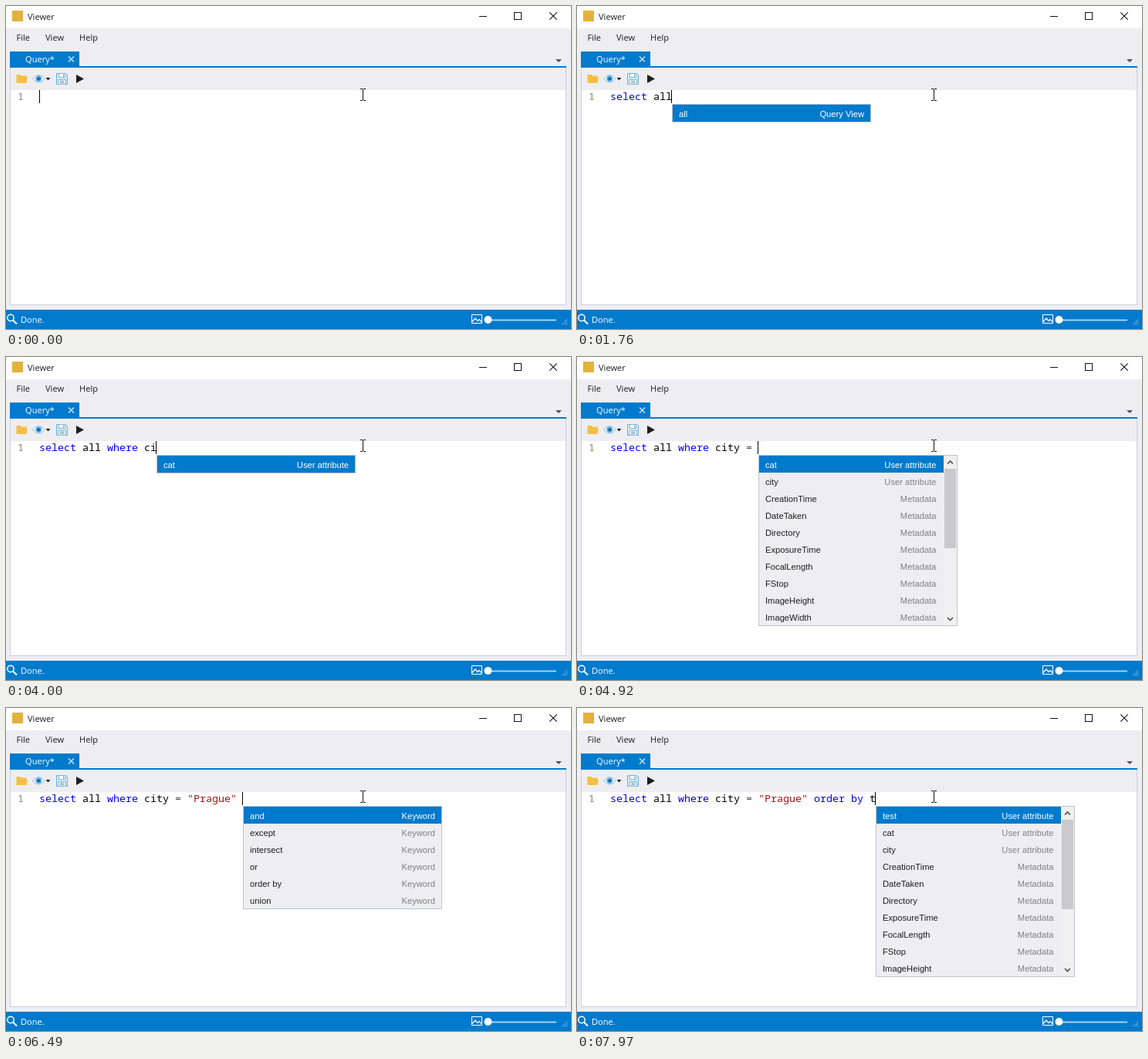
Animation of 732 by 419 pixels, one loop 8 s. Source, as an HTML page:

```html
<!DOCTYPE html>
<html lang="en">
<head>
<meta charset="utf-8">
<title>Viewer</title>
<style>
  html, body { margin: 0; width: 100%; height: 100%; overflow: hidden; background: #eeeef2; }
  svg { display: block; }
  .ui { font: 11.1px "Open Sans", "Noto Sans", sans-serif; fill: #1e1e1e; }
  .code { font: 13.333px "Noto Sans Mono", "DejaVu Sans Mono", monospace; }
  .list { font: 11.2px "Liberation Sans", Arial, sans-serif; fill: #1e1e1e; }
  .kind { fill: #7f7f84; text-anchor: end; }
  .light, .light .kind { fill: #fff; }
  .crisp { shape-rendering: crispEdges; }
  .line { fill: none; stroke: #111; }
</style>
</head>
<body>
<svg width="732" height="419" viewBox="0 0 732 419">
  <rect width="732" height="419" fill="#eeeef2"/>
  <rect width="732" height="29" fill="#fff"/>

  <!-- title bar -->
  <rect x="8" y="6" width="14" height="14" fill="#e3b23c"/>
  <text class="ui" x="28" y="18">Viewer</text>
  <g class="line">
    <path class="crisp" d="M613 13.5h10M658.5 8.5h9v9h-9z"/>
    <path d="M704.3 8.3l9.4 9.4M713.7 8.3l-9.4 9.4" stroke-width="1.1"/>
  </g>

  <!-- menu -->
  <g class="ui">
    <text x="13.5" y="45">File</text>
    <text x="51" y="45">View</text>
    <text x="95" y="45">Help</text>
  </g>

  <!-- tab and panel -->
  <g class="crisp">
    <rect x="5" y="59" width="90" height="20" fill="#007acc"/>
    <rect x="5.5" y="79.5" width="720" height="308" fill="#eeeef2" stroke="#cccedb"/>
    <rect x="5" y="78" width="721" height="2" fill="#007acc"/>
    <rect x="6" y="109" width="719" height="278" fill="#fff"/>
  </g>
  <text class="ui light" x="25" y="73">Query*</text>
  <path d="M81 65.5l7 7M88 65.5l-7 7" stroke="#b9dcf3" stroke-width="1.7"/>
  <path d="M712 69h8l-4 4z" fill="#5d4a66"/>

  <!-- toolbar -->
  <path d="M13.5 89h5l1.5 1.5h6.5v2H28l-1.5 7.5h-13z" fill="#f5bf45"/>
  <path d="M34.500 94.500Q42.500 84.500 50 94.500Q42.500 104 34.500 94.500z" fill="#f3f9fd" stroke="#85bfe3"/>
  <circle cx="42.300" cy="94.300" r="3.800" fill="#4ba3dc"/>
  <circle cx="42.300" cy="94.300" r="1.600" fill="#174f7c"/>
  <path d="M51.500 93h6l-3 3.500z" fill="#222"/>
  <path d="M65.500 87.500h12l2 2v12h-14z" fill="#d5ebf8" stroke="#6ab0d8"/>
  <path d="M68.500 87.500h8v5h-8zM68 95.500h9.500v6H68z" fill="#fff" stroke="#7fb4d2"/>
  <path d="M74.500 88.500v3M70 97.500h5.500M70 99.500h5.500" stroke="#5f8fa9"/>
  <path d="M91 89l10 5.500-10 5.500z" fill="#1e1e1e"/>

  <!-- status bar -->
  <rect y="394" width="732" height="25" fill="#007acc"/>
  <g fill="none" stroke="#fff">
    <circle cx="6" cy="404.500" r="4.200" stroke-width="1.500"/>
    <path d="M9 407.500l5 5" stroke-width="2"/>
    <path d="M603.500 400.500h13v11h-13z"/>
    <path d="M604 409.500l4-4.500 3 3.500 2-2 3.500 3.500" stroke-width="1.200"/>
    <path d="M625 407.500h88" stroke="#a5d0ee" stroke-width="1.800"/>
  </g>
  <circle cx="624.500" cy="407" r="5" fill="#fff"/>
  <text class="ui light" x="19" y="411">Done.</text>
  <g id="grip" class="crisp" fill="#a9c9de"></g>

  <!-- editor -->
  <text class="code" x="15" y="122" fill="#8b8b6c">1</text>
  <g id="editor"></g>
  <path class="line crisp" d="M459 107.500h3M463 107.500h3M462.500 108v14M459 122.500h3M463 122.500h3"/>
</svg>

<script>
const DURATION = 8000, LEFT = 43, CHAR = 8, ROW = 22, MAX_ROWS = 10;
const query = 'select all where city = "Prague" order by t';
const keywords = new Set(["select", "where", "or", "order", "by"]);

const items = (kind, names) => names.split(" ").map(name => [name, kind]);
const one = (name, kind) => [[name, kind]];
const orderBy = ["order by", "Keyword"];

const views = items("Query View", "all cats photos videos");
const afterView = [...items("Keyword", "except intersect"), orderBy, ...items("Keyword", "union where")];
const afterTerm = [...items("Keyword", "and except intersect or"), orderBy, ...items("Keyword", "union")];
const attributes = [
  ...items("User attribute", "cat city"),
  ...items("Metadata", "CreationTime DateTaken Directory ExposureTime FocalLength FStop ImageHeight " +
    "ImageWidth LastAccessTime LastWriteTime Latitude Longitude Name Orientation Size"),
  ...items("User attribute", "test"),
];
const prague = one('"Prague"', "String");

// Entries that start with the typed part come before those that only contain it.
function match(list, part) {
  const at = item => item[0].toLowerCase().indexOf(part);
  return [...list.filter(i => at(i) === 0), ...list.filter(i => at(i) > 0)];
}

// [time, typed characters, suggestions, caret hidden]
const steps = [
  [0, 0],
  [530, 0, null, true],
  [760, 1, one("select", "Keyword")],
  [830, 2, one("select", "Keyword")],
  [1290, 6],
  [1370, 7],
  [1450, 7, views],
  [1600, 8, one("all", "Query View")],
  [1680, 9, one("all", "Query View")],
  [1760, 10, one("all", "Query View")],
  [2290, 10, one("all", "Query View"), true],
  [2610, 11, afterView],
  [2840, 12, match(afterView, "w")],
  [3240, 16],
  [3390, 16, null, true],
  [3850, 17, attributes],
  [3930, 18, match(attributes, "c")],
  [4000, 19, one("cat", "User attribute")],
  [4080, 19, match(attributes, "ci")],
  [4460, 21],
  [4540, 22],
  [4620, 22, afterTerm],
  [4770, 23, attributes],
  [4920, 24, attributes],
  [5090, 25, prague],
  [5170, 26, prague],
  [5240, 27, prague],
  [5410, 32, prague],
  [5710, 32, prague, true],
  [6260, 32, prague],
  [6490, 33, afterTerm],
  [6810, 34, match(afterTerm, "o")],
  [6890, 35, one("or", "Keyword")],
  [7040, 36, [orderBy]],
  [7270, 37, [orderBy]],
  [7350, 38, [orderBy]],
  [7500, 41],
  [7820, 42],
  [7900, 42, attributes],
  [7970, 43, match(attributes, "t")],
];

const rect = (x, y, w, h, fill, extra = "") =>
  `<rect class="crisp" x="${x}" y="${y}" width="${w}" height="${h}" fill="${fill}" ${extra}/>`;

function color(token) {
  if (keywords.has(token)) return "#00f";
  if (/^".+"$/.test(token)) return "#a31515";
  return token === "=" ? "#444" : "#000";
}

function drawCode(text) {
  return [...text.matchAll(/"[^"]*"|\w+|\S/g)].map(({ 0: token, index }) =>
    `<text class="code" x="${LEFT + CHAR * index}" y="122" fill="${color(token)}">${token}</text>`).join("");
}

function drawScrollbar(x, count) {
  const thumb = Math.round(186 * MAX_ROWS / count);
  return rect(x, 128, 16, 220, "#f0f0f0") + rect(x, 145, 15, thumb, "#c9c9cc") +
    `<path d="M${x + 4} 138.500l3.500-3.500 3.500 3.500M${x + 4} 338l3.500 3.500 3.500-3.500"
      fill="none" stroke="#505050" stroke-width="1.600"/>`;
}

function drawPopup(x, list) {
  const rows = list.slice(0, MAX_ROWS);
  const scrolls = list.length > MAX_ROWS;
  const width = scrolls ? 239 : 256;
  const kindX = x + (scrolls ? 230.5 : 249);
  const body = rows.map(([name, kind], i) => {
    const y = 143.5 + ROW * i;
    return `<g class="list ${i ? "" : "light"}"><text x="${x + 9}" y="${y}">${name}</text>` +
      `<text class="kind" x="${kindX}" y="${y}">${kind}</text></g>`;
  }).join("");
  return rect(x + .5, 127.5, 257, ROW * rows.length + 1, "#eeeef2", 'stroke="#bfc2cc"') +
    rect(x + 1, 128, width, ROW, "#007acc") + body +
    (scrolls ? drawScrollbar(x + 241, list.length) : "");
}

const editor = document.getElementById("editor");

function draw([, typed, list, caretHidden]) {
  const end = LEFT + CHAR * typed;
  editor.innerHTML = drawCode(query.slice(0, typed)) +
    (caretHidden ? "" : rect(typed ? end - 1 : LEFT, 109, 1, 17, "#000")) +
    (list ? drawPopup(end, list) : "");
}

let dots = "";
for (let row = 0; row < 4; row++)
  for (let col = 0; col <= row; col++)
    dots += rect(726 - 2 * col, 406 + 2 * (3 - row) + 4 * row - 2 * row, 1, 1, "#a9c9de");
document.getElementById("grip").innerHTML = [0, 1, 2, 3].flatMap(row =>
  Array.from({ length: row + 1 }, (_, col) =>
    rect(726 - 2 * col, 406 + 2 * row, 1, 1, "#a9c9de"))).join("");

const start = performance.now();
let shown;
function tick() {
  const time = (performance.now() - start) % DURATION;
  const step = steps.findLast(s => s[0] <= time);
  if (step !== shown) draw(shown = step);
  requestAnimationFrame(tick);
}
tick();
</script>
</body>
</html>
```
